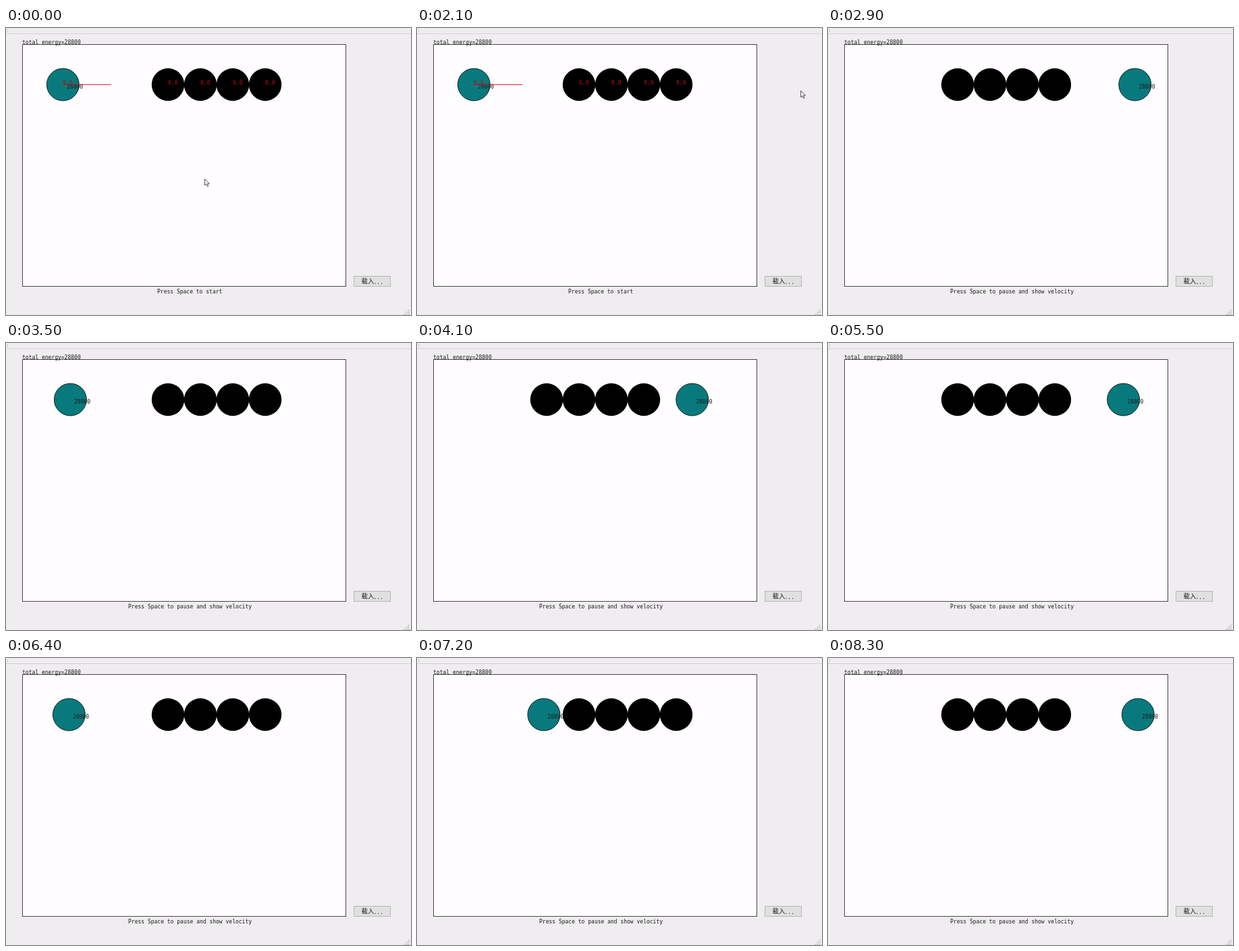
Recreate the animation shown at these times as an HTML page. Size 600 px wide and 426 px high, loop 8400 ms.

```html
<!DOCTYPE html>
<html lang="zh">
<head>
<meta charset="utf-8">
<style>
html, body { margin: 0; width: 100%; height: 100%; overflow: hidden; background: #efedef; }
svg { display: block; width: 600px; height: 426px; }
text { font: 8px "DejaVu Sans Mono", "Liberation Mono", monospace; white-space: pre; fill: #1c1c1c; }
.red { fill: #b0101c; }
.cjk { font: 300 9.4px "Noto Sans CJK SC", "Noto Sans CJK", sans-serif; }
</style>
</head>
<body>
<svg viewBox="0 0 600 426">
  <clipPath id="inside"><rect x="24" y="24" width="480" height="360"/></clipPath>

  <!-- window -->
  <path d="M0 8.5H600" stroke="#d4d2d4"/>
  <path d="M2.5 2v1m0 1.4v1" stroke="#999"/>
  <path d="M596.5 418v2m0 1v2m0 1v2m-3-5v2m0 1v2m-3-2v2" stroke="#c4c2c4" stroke-width="2"/>
  <rect x="515.5" y="368.5" width="54" height="15" fill="#e1e0e1" stroke="#b8b7b8"/>
  <text class="cjk" x="526.5" y="379.3">载入</text>
  <text x="544.5" y="379.6">...</text>

  <!-- table -->
  <rect x="24.5" y="24.5" width="479" height="359" fill="#fffdff" stroke="#484848"/>
  <text x="24" y="23.7">total energy=28800</text>
  <text id="hint" y="393.7"></text>

  <g clip-path="url(#inside)">
    <circle id="ball" cy="84" r="24" fill="#087a7d" stroke="#000" stroke-width=".8"/>
    <g id="chain"></g>
    <text id="energy" y="89.7">28800</text>
    <g id="velocity">
      <path d="M84 84H156" stroke="#c8141e"/>
    </g>
  </g>

  <path id="cursor" d="M0 0V9.6L2.2 7.6 3.9 11.2 5.4 10.5 3.8 7H6.8Z" fill="#fff" stroke="#222" stroke-width=".8"/>
</svg>
<script>
const $ = id => document.getElementById(id);
const START = 25;        // tick at which the balls are released
const SPEED = 36.417;    // pixels per tick of 100 ms
const LEFT = 46, RIGHT = 478;     // turning points of the moving ball
const HIT_LEFT = 192, HIT_RIGHT = 384;
const REST = [240, 288, 336, 384];

$('chain').innerHTML = REST.map(x => `<circle cx="${x}" cy="84" r="24.2"/>`).join('');
$('velocity').innerHTML += [84, ...REST]
  .map(x => `<text class="red" x="${x}" y="83.7">0,0</text>`).join('');

// Position of whichever ball carries the energy
function ballX(tick) {
  if (tick < START) return 84;
  const lead = tick < START + 5 ? 4 : 0;   // ahead until the first rebound
  const half = HIT_LEFT - LEFT + RIGHT - HIT_RIGHT;
  const s = (66.8 + lead + SPEED * (tick - START)) % (2 * half);
  const x = LEFT + (s < half ? s : 2 * half - s);
  return x < HIT_LEFT ? x : x + HIT_RIGHT - HIT_LEFT;
}

function draw() {
  const tick = Math.floor((performance.now() - t0) % 8400 / 100);
  const running = tick >= START;
  const x = ballX(tick);
  $('ball').setAttribute('cx', x + 0.3);
  $('energy').setAttribute('x', x + 6);
  $('chain').setAttribute('transform', `translate(${x >= HIT_RIGHT ? -48 : 0})`);
  $('velocity').style.display = $('cursor').style.display = running ? 'none' : '';
  $('hint').textContent = running ? 'Press Space to pause and show velocity' : 'Press Space to start';
  $('hint').setAttribute('x', running ? 181 : 224);

  // The pointer slows down as it leaves to the right
  const p = Math.min(1, Math.max(0, (tick - 16) / 9));
  const e = 1 - (1 - p) ** 2.66;
  $('cursor').setAttribute('transform', `translate(${294.5 + 310 * e} ${224 - 148 * e})`);
  requestAnimationFrame(draw);
}
const t0 = performance.now();
draw();
</script>
</body>
</html>
```
